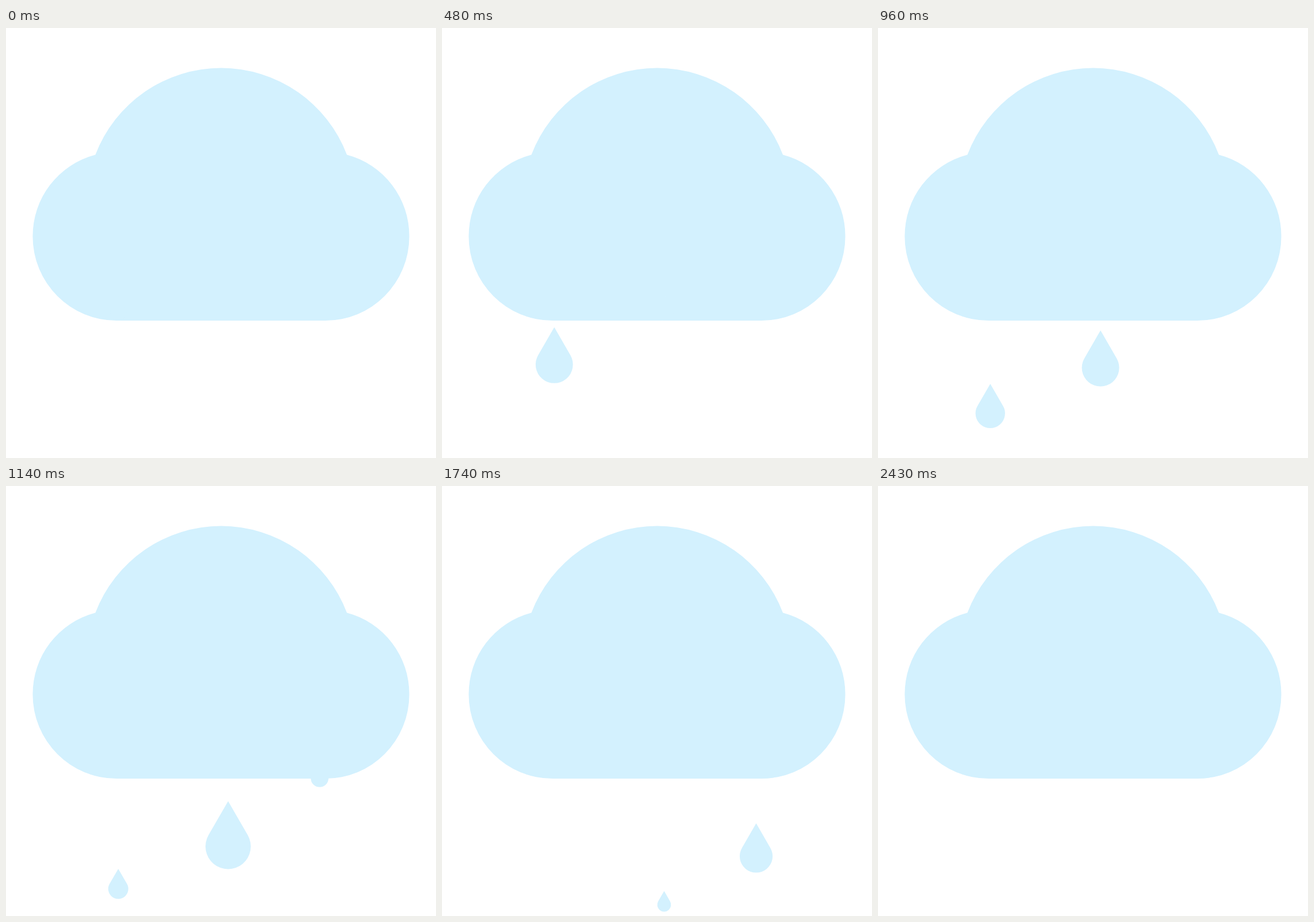
An HTML page for the animation above (2.73 s loop, 748 by 748 pixels).

```html
<!DOCTYPE html>
<html lang="en">
<head>
<meta charset="utf-8">
<title>Rain cloud</title>
<style>
  html, body { margin: 0; width: 100%; height: 100%; overflow: hidden; background: #fff; }
  svg { display: block; width: 100vw; height: 100vh; fill: #d3f1fe; }
</style>
</head>
<body>
<svg viewBox="0 0 748 748">
  <path d="M192.5 509A146 146 0 0 1 46.5 363A146 146 0 0 1 155.5 220.5A234 234 0 0 1 593 220.5A146 146 0 0 1 701.5 363A146 146 0 0 1 555.5 509Z"/>
  <g id="rain"></g>
</svg>
<script>
const LOOP = 2730, TICK = 30;

// Every drop leaves the cloud's lower edge, swells while falling, then shrinks away.
const GROW = 660, EDGE_Y = 495, FIRST_R = 14, LAST_R = 10.6;
const drops = [
  { start: 0, shrink: 630, x: 195.3, drift: 0, midY: 619.3, endY: 726.3, peak: 39.4 },
  { start: 480, shrink: 630, x: 386.4, drift: 2.5, midY: 627, endY: 733.6, peak: 39.4 },
  { start: 1080, shrink: 660, x: 546.5, drift: -1, midY: 644, endY: 740, peak: 28.6 }
];

const rain = document.getElementById('rain');
for (const drop of drops) {
  drop.shape = document.createElementNS('http://www.w3.org/2000/svg', 'path');
  drop.shape.setAttribute('d', 'M0 -2L.866 -.5A1 1 0 1 1 -.866 -.5Z');
  rain.append(drop.shape);
}

const mix = (a, b, k) => a + (b - a) * k;

function place(drop, t) {
  const age = t - drop.start;
  const shown = age >= 0 && age <= GROW + drop.shrink;
  drop.shape.setAttribute('visibility', shown ? 'visible' : 'hidden');
  if (!shown) return;

  const up = Math.min(age / GROW, 1);
  const down = Math.max((age - GROW) / drop.shrink, 0);
  const x = drop.x + drop.drift * (1 - up);
  const y = mix(mix(EDGE_Y, drop.midY, up), drop.endY, down);
  const r = mix(mix(FIRST_R, drop.peak, up), LAST_R, down);
  drop.shape.setAttribute('transform', `translate(${x} ${y}) scale(${r})`);
}

const start = performance.now();
function loop() {
  const t = Math.floor((performance.now() - start) % LOOP / TICK) * TICK;
  drops.forEach(drop => place(drop, t));
  requestAnimationFrame(loop);
}
loop();
</script>
</body>
</html>
```
